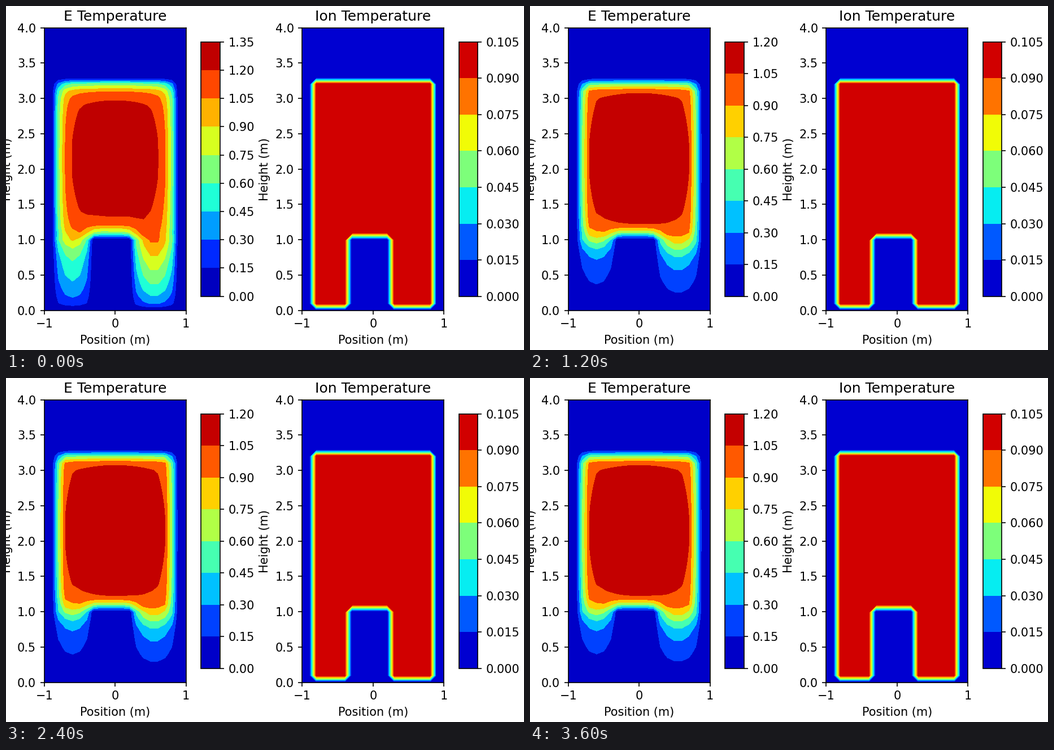
Recreate the animation shown at these times as a matplotlib script. Size 917x611 px, loop 4600 ms.

```python
import numpy as np
import matplotlib.pyplot as plt
from matplotlib.animation import FuncAnimation

W, H, DPI = 917, 611, 128
S = 150 / DPI  # keeps text and lines at 150 dpi proportions

plt.rcParams.update({
    "font.family": "DejaVu Sans",
    "font.size": 10 * S,
    "axes.linewidth": 0.8 * S,
    "axes.labelpad": 4 * S,
    "axes.titlepad": 6 * S,
})
for axis in ("xtick", "ytick"):
    plt.rcParams.update({
        f"{axis}.major.size": 3.5 * S,
        f"{axis}.major.width": 0.8 * S,
        f"{axis}.major.pad": 3.5 * S,
    })

STATES = 10
STEP_MS, LOOP_MS, STATE_MS = 200, 4600, 400

# The plasma is a box standing on two legs, with a block between them
WALL, ROOF = 0.9, 3.3
BLOCK_L, BLOCK_R, BLOCK_TOP = -0.3, 0.2, 1.0

X, Y = np.meshgrid(np.round(np.linspace(-1, 1, 21), 1),
                   np.round(np.linspace(0, 4, 41), 1))
block = (X >= BLOCK_L) & (X <= BLOCK_R) & (Y <= BLOCK_TOP)
plasma = (np.abs(X) < WALL) & (Y > 0) & (Y < ROOF) & ~block
left = X < 0

# Profile across each leg, and how much a column belongs to a leg
t = np.where(left, (X + WALL) / (BLOCK_L + WALL),
             (X - BLOCK_R) / (WALL - BLOCK_R))
across = np.sin(np.pi * np.clip(t, 0, 1)) ** 0.65
gap = np.maximum(BLOCK_L - X, X - BLOCK_R)
leg_share = np.clip(0.15 + 4.5 * gap, 0, 1)


def temperature(peak, width, power, leg_left, leg_right, leg_power):
    def edge(dist):
        return 1 - np.exp(-(np.maximum(dist, 0) / width) ** power)

    dome = (1 - 0.1 * (X / WALL) ** 2) * (1 - 0.115 * ((Y - 2.15) / 1.15) ** 2)
    core = peak * dome * edge(WALL - np.abs(X)) * edge(ROOF - Y)

    # Legs: a power law from the floor that rises into the core
    base = np.where(left, leg_left, leg_right) * Y ** leg_power
    rise = 1 / (1 + np.exp((np.where(left, 1.0, 0.94) - Y) / 0.083))
    hip = 0.87 * peak
    leg = base + (hip - base) * rise

    foot = leg_share * leg / hip + (1 - leg_share) * edge(Y - BLOCK_TOP)
    inside = np.where(Y > BLOCK_TOP, core * foot, leg * across)
    return np.where(plasma, inside, 0.0)


hot = temperature(1.31, 0.115, 1.26, 0.7, 1.0, 0.5)
steady = temperature(1.165, 0.11, 2, 0.37, 0.5, 1)


def electrons(k):
    """Relax from the hot start to the steady state, slowest near the floor."""
    if k == 0:
        return hot
    n = k - 1
    near_floor = np.exp(-(Y / (0.25 + 0.05 * n)) ** 2)
    lag = 0.2 * 0.28 ** n + 0.3 * 0.5 ** n * near_floor
    return steady + lag * (hot - steady)


fig = plt.figure(figsize=(W / DPI, H / DPI), dpi=DPI, facecolor="white")


def add_axes(x, top, width, height):
    return fig.add_axes([x / W, 1 - (top + height) / H, width / W, height / H])


def panel(x, title):
    ax = add_axes(x, 38.7, 251, 502)
    ax.set(title=title, xlabel="Position (m)", ylabel="Height (m)",
           xlim=(-1, 1), ylim=(0, 4),
           xticks=[-1, 0, 1], yticks=np.arange(0, 4.1, 0.5))
    return ax


def add_bar(contours, x, levels):
    cax = add_axes(x, 63.8, 33.4, 451.8)
    fig.colorbar(contours, cax=cax, ticks=levels)
    return cax


ax_e = panel(67.7, "E Temperature")
ax_i = panel(524.4, "Ion Temperature")

ion_levels = np.arange(8) * 0.015
ions = ax_i.contourf(X, Y, 0.1 * plasma, levels=ion_levels, cmap="jet")
add_bar(ions, 802, ion_levels)

hot_levels = np.arange(10) * 0.15
cool_levels = hot_levels[:-1]
fields = [ax_e.contourf(X, Y, electrons(k), cmap="jet",
                        levels=cool_levels if k else hot_levels)
          for k in range(STATES)]
hot_bar = add_bar(fields[0], 345.3, hot_levels)
cool_bar = add_bar(fields[1], 345.3, cool_levels)


def update(i):
    state = min(i * STEP_MS // STATE_MS, STATES - 1)
    for k, field in enumerate(fields):
        field.set_visible(k == state)
    hot_bar.set_visible(state == 0)
    cool_bar.set_visible(state > 0)
    return fields


anim = FuncAnimation(fig, update, frames=LOOP_MS // STEP_MS,
                     interval=STEP_MS, repeat=True, repeat_delay=0)
plt.show()
```
